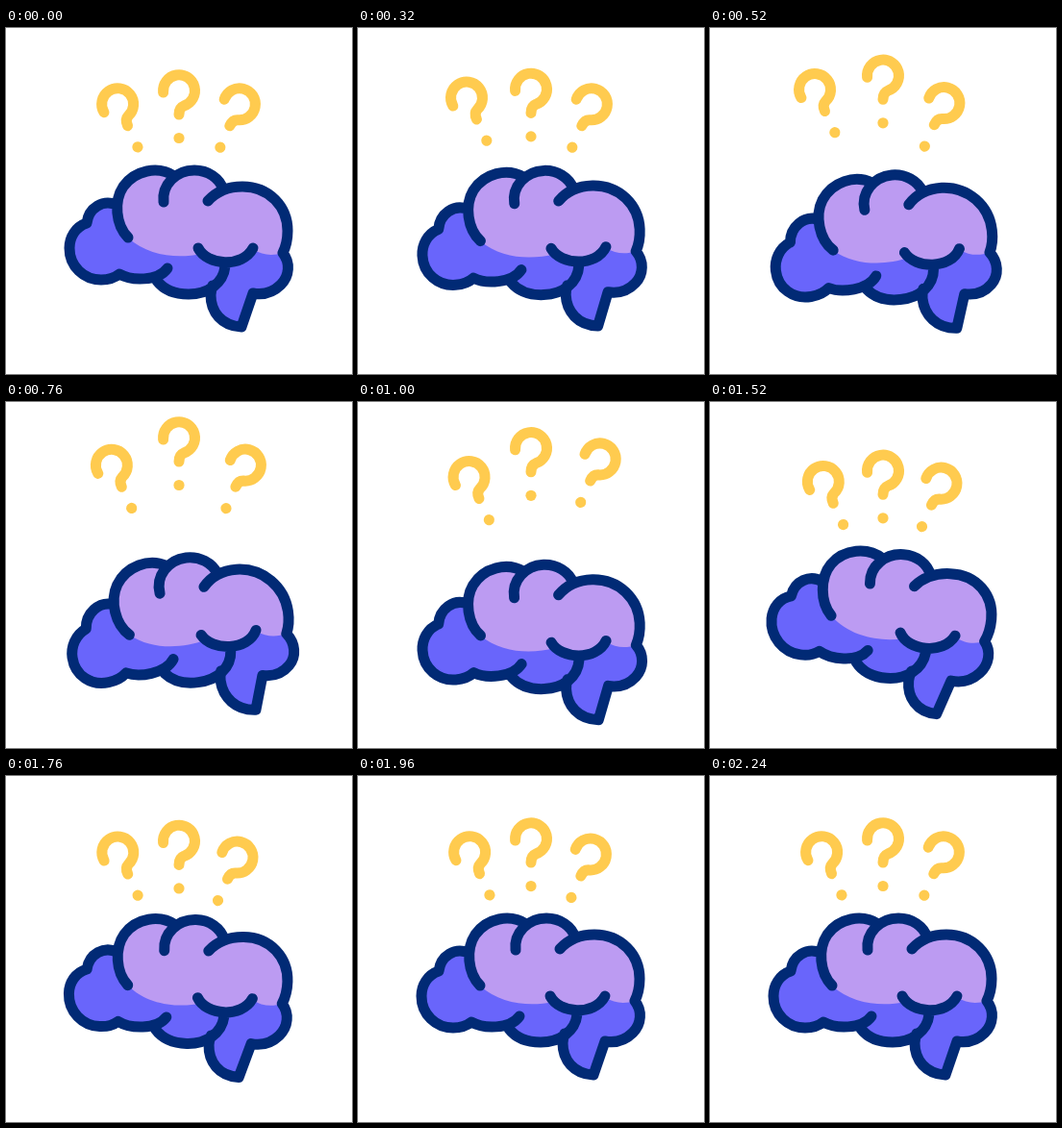
An HTML page that plays this animation: 360x360 px, repeating every 2280 ms.

```html
<!DOCTYPE html>
<html lang="en">
<head>
<meta charset="utf-8">
<title>Puzzled brain</title>
<style>
  html, body { margin: 0; width: 100%; height: 100%; overflow: hidden; background: #fff; }
  svg { display: block; width: 100%; height: 100%; }
  .line { fill: none; stroke: #012a75; stroke-width: 11; stroke-linecap: round; stroke-linejoin: round; }
  .hook { fill: none; stroke: #ffcb4f; stroke-width: 11; stroke-linecap: round; }
  .dot { fill: #ffcb4f; }
</style>
</head>
<body>
<svg viewBox="0 0 360 360" id="stage"></svg>
<script>
const LOOP = 2280, STEP = 40;

// Eases from 0 at a to 1 at b.
function ease(t, a, b) {
  const u = Math.min(Math.max((t - a) / (b - a), 0), 1);
  return (1 - Math.cos(Math.PI * u)) / 2;
}

// Swings from rest to a peak, past rest to a dip, and back.
const swing = (t, peak, dip, start, top, bottom, end) =>
  peak * ease(t, start, top) - (peak + dip) * ease(t, top, bottom) + dip * ease(t, bottom, end);

const drop = t => 22.5 * (ease(t, 200, 1080) - ease(t, 1080, 1880));
const tilt = t => swing(t, 15.5, 11, 80, 720, 1380, 1960);
const hop = (t, height) => swing(t, height, 7, 240, 760, 1400, 2000);

// Lowers and turns the brain; the left side bends further than the right.
function bend(x, y, t) {
  const u = (180 - x) / 115, turn = tilt(t);
  return [x + turn * (y - 208) / 105, y + drop(t) + turn * (u + 0.4 * u * u)];
}

const LEFT = "M84 203C72 207 66 218 66 229C66 248 81 262 99 262C107 262 113 260 118 256";
const LOBE = "M127 218C114 205 112 180 122 165C134 148 158 143 175 154";
const RIGHT = "C274 165 293 186 293 211C293 220 291 228 288 234";
const BODY = LEFT + "C130 263 148 264 157 263C164 272 176 277 190 277C201 277 209 274 213 278"
  + "C213 295 224 310 245 311L257 276C268 278 278 275 286 267C295 258 296 244 288 234"
  + "L246 200L150 190L115 184C101 178 86 187 84 203Z";
const CROWN = LOBE + "C182 149 189 148 196 148C210 148 222 156 226 168C232 166 239 165 246 165" + RIGHT
  + "C278 237 267 237 257 230C246 250 212 248 203 235C180 240 148 238 127 218Z";
const LINES = LEFT + "C130 263 158 264 168 250"
  + "M84 203C86 187 101 178 115 184" + LOBE
  + "M164 181C162 163 177 148 196 148C210 148 222 156 226 168"
  + "M210 180C219 170 232 165 246 165" + RIGHT
  + "C296 244 295 258 286 267C278 275 268 278 257 276L245 311C224 310 213 295 213 278C213 274 214 271 215 268"
  + "M228 248C226 266 210 277 190 277C176 277 164 272 157 263"
  + "M200 229C209 247 246 250 257 229";

const MARKS = [
  { x: 116, y: 79, angle: -25, height: 18, delay: -150 },
  { x: 180, y: 65, angle: 0, height: 28, delay: 0 },
  { x: 243, y: 79, angle: 24, height: 22, delay: 200 }
];

const stage = document.getElementById("stage");
function add(parent, tag, attributes) {
  const node = document.createElementNS("http://www.w3.org/2000/svg", tag);
  for (const name in attributes) node.setAttribute(name, attributes[name]);
  return parent.appendChild(node);
}

const brain = [
  { shape: BODY, node: add(stage, "path", { fill: "#6965fb" }) },
  { shape: CROWN, node: add(stage, "path", { fill: "#bc9bf2" }) },
  { shape: LINES, node: add(stage, "path", { class: "line" }) }
];
for (const mark of MARKS) {
  mark.node = add(stage, "g", {});
  add(mark.node, "path", { class: "hook", d: "M-16.4 2A16.5 16.5 0 1 1 5 16Q0 18 0 25" });
  add(mark.node, "circle", { class: "dot", cy: 49.5, r: 5.6 });
}

function draw(t) {
  for (const { shape, node } of brain) {
    node.setAttribute("d", shape.replace(/(\d+) (\d+)/g, (_, x, y) =>
      bend(+x, +y, t).map(v => v.toFixed(2)).join(" ")));
  }
  // Each mark hops along its own axis.
  for (const { node, x, y, angle, height, delay } of MARKS) {
    node.setAttribute("transform",
      `translate(${x} ${y}) rotate(${angle}) translate(0 ${-hop(t - delay, height)})`);
  }
}

const start = performance.now();
function tick() {
  const t = (performance.now() - start) % LOOP;
  draw(Math.floor(t / STEP) * STEP);
  requestAnimationFrame(tick);
}
tick();
</script>
</body>
</html>
```
